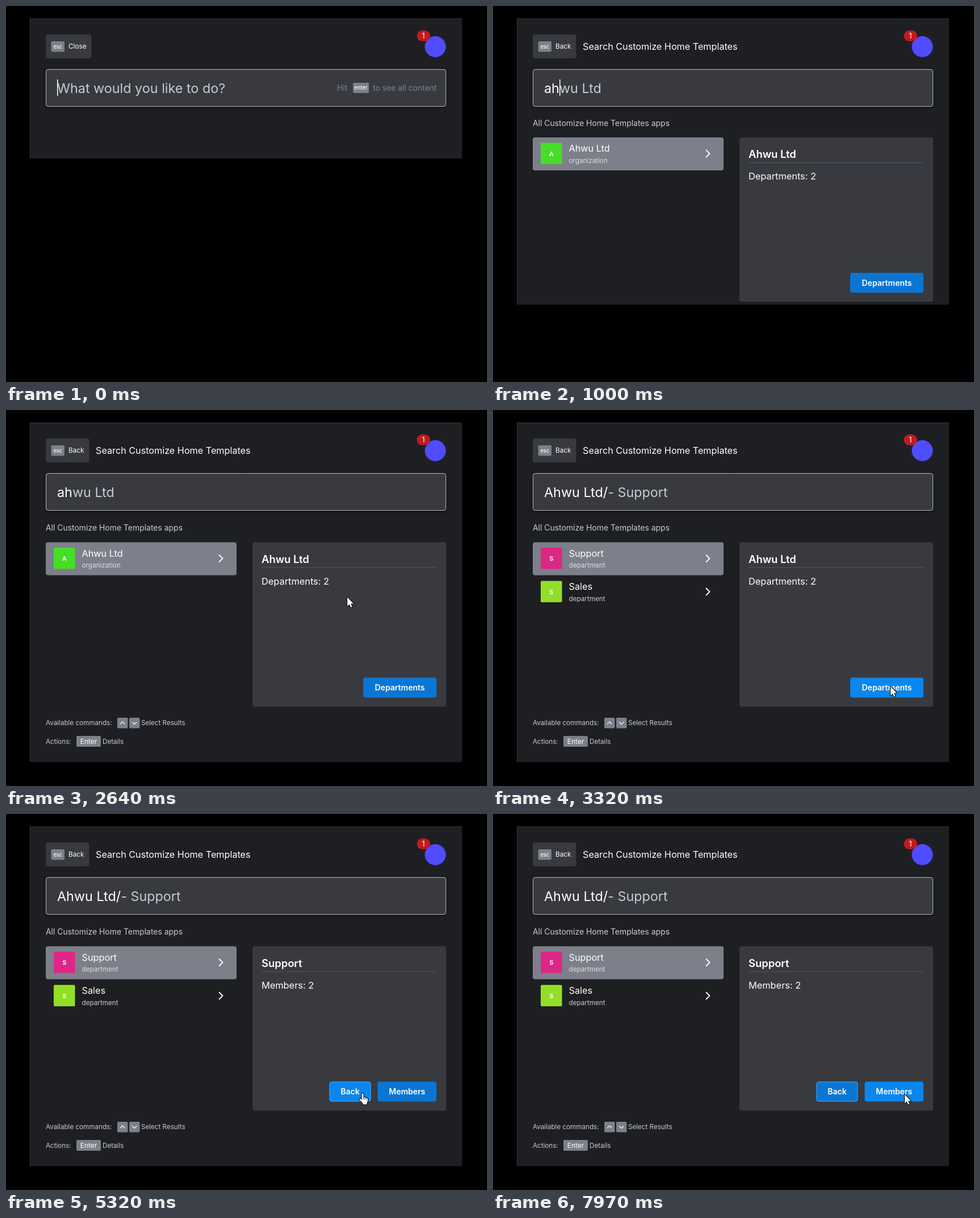
These frames come from a looping animation (847 px wide and 661 px high, 8000 ms). An HTML page with a canvas:

```html
<!DOCTYPE html>
<html lang="en">
<head>
<meta charset="utf-8">
<title>Command search</title>
<style>
  html, body { margin: 0; width: 100%; height: 100%; overflow: hidden; background: #000; }
  canvas { display: block; }
</style>
</head>
<body>
<canvas id="stage" width="847" height="661"></canvas>
<script>
const ctx = document.getElementById('stage').getContext('2d');
const LOOP = 8000;
const ORG = 'Ahwu Ltd';
const C = {
  panel: '#1e1f23', card: '#383a40', line: '#53565f', key: '#7d808a', hover: '#45474e',
  soft: '#c9cbd2', white: '#fff', blue: '#0a76d3', blueHover: '#0b86ec', focus: '#45a3f2'
};

// Pointer hotspot: time, x, y
const PATH = [
  [1460, 560, 577], [1600, 590, 480], [1800, 603, 380], [2160, 603, 318], [2380, 603, 318],
  [2640, 601, 328], [2800, 640, 440], [2920, 690, 505], [3120, 700, 486], [3740, 700, 486],
  [3930, 560, 400], [4140, 339, 265], [4210, 270, 255], [4350, 209, 260], [4560, 209, 260],
  [4750, 230, 315], [5000, 400, 420], [5320, 628, 490], [5860, 628, 490], [6050, 480, 330],
  [6340, 249, 125], [6480, 164, 170], [6680, 290, 253], [6820, 480, 380], [6950, 729, 502],
  [7050, 729, 502], [7160, 724, 493], [7950, 724, 493], [7970, 725, 493]
];

const ARROW = new Path2D('M0 0V16L3.7 12.6L6 18L8.4 17L6.2 11.5H11Z');
const HAND = new Path2D('M5 13V2.2a1.5 1.5 0 0 1 3 0V8.2q1.4-1 2.6 .4q1.5-.8 2.5 .5q2.2-.4 2.4 1.8V14' +
  'q0 2.5-1.5 4.2V20.5H6.8V18.6Q4.2 16 1 12.2Q.2 10.4 2 10.2Q3.4 10.4 5 13Z');
const KNUCKLES = new Path2D('M8 8V12M10.6 8.8V12M13.1 9.4V12');
const IBEAM = new Path2D('M-4 -7.5H-1.5Q.5 -7.5 .5 -6V6Q.5 7.5 -1.5 7.5H-4M5 -7.5H2.5Q.5 -7.5 .5 -6M.5 6Q.5 7.5 2.5 7.5H5');

const within = (t, a, b) => t >= a && t < b;

function box(x, y, w, h, r, fill, border) {
  ctx.beginPath();
  ctx.roundRect(x, y, w, h, r);
  ctx.fillStyle = fill;
  ctx.fill();
  if (!border) return;
  ctx.beginPath();
  ctx.roundRect(x + .5, y + .5, w - 1, h - 1, r);
  stroke(border, 1);
}

function stroke(color, width, path) {
  ctx.strokeStyle = color;
  ctx.lineWidth = width;
  path ? ctx.stroke(path) : ctx.stroke();
}

function text(str, x, y, size, color = C.white, weight = 400, align = 'left') {
  ctx.font = `${weight} ${size}px Inter, sans-serif`;
  ctx.textAlign = align;
  ctx.fillStyle = color;
  ctx.fillText(str, x, y);
  return ctx.measureText(str).width;
}

function chevron(x, y, dx, dy, color, width) {
  // Tip at (x, y); one of dx, dy is the depth, arms open across it
  const s = Math.abs(dx + dy);
  ctx.beginPath();
  ctx.moveTo(x - dx - (dx ? 0 : s), y - dy - (dx ? s : 0));
  ctx.lineTo(x, y);
  ctx.lineTo(x - dx + (dx ? 0 : s), y - dy + (dx ? s : 0));
  stroke(color, width);
}

function pointerAt(t) {
  if (t < PATH[0][0]) return null;
  const i = PATH.findIndex(p => p[0] > t);
  if (i < 0) return PATH.at(-1).slice(1);
  const [t0, x0, y0] = PATH[i - 1], [t1, x1, y1] = PATH[i];
  const k = (t - t0) / (t1 - t0);
  return [Math.round(x0 + (x1 - x0) * k), Math.round(y0 + (y1 - y0) * k)];
}

const over = (p, x, y, w, h) => !!p && p[0] >= x && p[0] < x + w && p[1] >= y && p[1] < y + h;

function header(results) {
  box(70, 50, results ? 76.5 : 80.5, 42, 4, C.card);
  box(79.5, 62, 23.5, 18.5, 2, C.key);
  text('esc', 91.2, 74.8, 9.2, C.white, 500, 'center');
  text(results ? 'Back' : 'Close', 110, 75.2, 11.75);
  if (results) text('Search Customize Home Templates', 158, 77, 16.2);

  ctx.beginPath();
  ctx.arc(756, 71.5, 18.5, 0, Math.PI * 2);
  ctx.fillStyle = '#504cff';
  ctx.fill();
  box(723.5, 43, 23.5, 19, 9.5, '#c01c1f');
  text('1', 735, 57.2, 13, C.white, 400, 'center');
}

function searchField(t, inOrg) {
  ctx.save();
  ctx.shadowColor = 'rgba(0,0,0,.45)';
  ctx.shadowBlur = 5;
  ctx.shadowOffsetY = 2;
  box(70, 111, 705, 66, 4, C.card);
  ctx.restore();
  box(70, 111, 705, 66, 4, C.card, '#b9bbc2');

  const size = 23.35, base = 152.6;
  let typed = '', hint = '';
  if (t < 730) {
    hint = 'What would you like to do?';
    text('Hit', 583, 148.5, 13.9, C.key);
    box(611, 135, 28, 18, 2, C.key);
    text('enter', 625, 147.3, 9.4, C.white, 500, 'center');
    text('to see all content', 646, 148.5, 13.9, C.key);
  } else if (t < 870) {
    typed = 'a';
  } else if (inOrg) {
    typed = ORG + '/';
    hint = '- Support';
  } else if (t < 5000) {
    typed = ORG.slice(0, 2).toLowerCase();
    hint = ORG.slice(2);
  } else {
    typed = ORG;
  }
  const w = text(typed, 90, base, size);
  text(hint, 90 + w, base, size, C.soft);
  const caret = t < 530 || within(t, 730, 1390) || within(t, 1890, 2360) || within(t, 2870, 3320);
  if (caret) {
    ctx.fillStyle = C.white;
    ctx.fillRect(90 + Math.round(w), 129, 1.5, 29);
  }
}

function row(y, name, kind, color, fill) {
  if (fill) box(70, y, 336, 58, 4, fill);
  box(84, y + 9.5, 37.5, 37.5, 2, color);
  text(name[0], 102.8, y + 32.7, 11, C.white, 600, 'center');
  text(name, 133.5, y + 25.3, 16.25);
  text(kind, 133.5, y + 44.6, 11.7, fill === C.key ? '#dcdde2' : C.soft);
  chevron(381.5, y + 28.5, 6.5, 0, C.white, 1.8);
}

function button(label, x, w, p, focused) {
  const hot = over(p, x - 2, 470, w + 4, 36);
  box(x, 470.5, w, 35, 4, hot ? C.blueHover : C.blue, focused && C.focus);
  text(label, x + w / 2, 493, 14, C.white, 600, 'center');
}

function details(inOrg, t, p) {
  box(434, 232.5, 341, 289, 4, C.card);
  text(inOrg ? 'Support' : ORG, 450, 268.6, 18.4, C.white, 600);
  ctx.fillStyle = C.line;
  ctx.fillRect(450, 276.5, 308, 1);
  text(inOrg ? 'Members: 2' : 'Departments: 2', 450, 306.7, 16.35);
  if (inOrg) {
    button('Back', 569.5, 73, p, true);
    button('Members', 654.5, 103.5, p, false);
  } else {
    button('Departments', 629, 129, p, t > 5000);
  }
}

function footer() {
  const size = 11.65;
  text('Available commands:', 70, 554.2, size, C.soft);
  box(196, 541, 18.5, 18.5, 2, C.key);
  box(217, 541, 18.5, 18.5, 2, C.key);
  chevron(205.2, 548, 0, -4, C.white, 1.2);
  chevron(226.2, 552.5, 0, 4, C.white, 1.2);
  text('Select Results', 238, 554.2, size, C.soft);
  text('Actions:', 70, 586.8, size, C.soft);
  box(124, 573, 43, 19, 2, C.key);
  text('Enter', 145.5, 586.8, 11.9, C.white, 400, 'center');
  text('Details', 170, 586.8, size, C.soft);
}

function pointer(p, inOrg) {
  if (!p) return;
  const onRow = over(p, 70, 232, 336, inOrg ? 118 : 59);
  const onButton = over(p, inOrg ? 567 : 627, 470, 133, 36);
  ctx.save();
  ctx.translate(p[0], p[1]);
  ctx.lineJoin = 'round';
  if (over(p, 70, 111, 705, 66)) {
    stroke('#000', 2.2, IBEAM);
    stroke('#e4e4e6', 1.1, IBEAM);
  } else {
    const hand = onRow || onButton;
    if (hand) ctx.translate(-6.5, 0);
    const shape = hand ? HAND : ARROW;
    stroke('#000', 2, shape);
    ctx.fillStyle = C.white;
    ctx.fill(shape);
    if (hand) stroke('#000', .8, KNUCKLES);
  }
  ctx.restore();
}

function draw(t) {
  const results = t >= 930;
  const listInOrg = within(t, 3320, 5450) || t >= 7490;
  const cardInOrg = within(t, 3390, 5520) || t >= 7560;
  const bottom = t < 930 ? 268 : t < 1070 ? 525 : 619;
  const p = pointerAt(t);

  ctx.fillStyle = '#000';
  ctx.fillRect(0, 0, 847, 661);
  ctx.fillStyle = C.panel;
  ctx.fillRect(42, 22, 761, bottom - 22);
  ctx.fillStyle = '#36373c';
  ctx.fillRect(42, 22, 761, 1);
  ctx.fillRect(42, 22, 1, bottom - 22);

  header(results);
  searchField(t, listInOrg);
  if (results) {
    ctx.save();
    if (t < 1070) ctx.translate(0, -1.5);
    text('All Customize Home Templates apps', 70, 212.2, 13.95, C.soft);
    if (listInOrg) {
      row(232.5, 'Support', 'department', '#de2686', C.key);
      row(291, 'Sales', 'department', '#93de26', over(p, 70, 291, 336, 58) && C.hover);
    } else {
      row(232.5, ORG, 'organization', '#46de26', C.key);
    }
    details(cardInOrg, t, p);
    ctx.restore();
  }
  if (t >= 1130) footer();
  pointer(p, listInOrg);
}

function tick() {
  draw(performance.now() % LOOP);
  requestAnimationFrame(tick);
}
tick();
</script>
</body>
</html>
```
